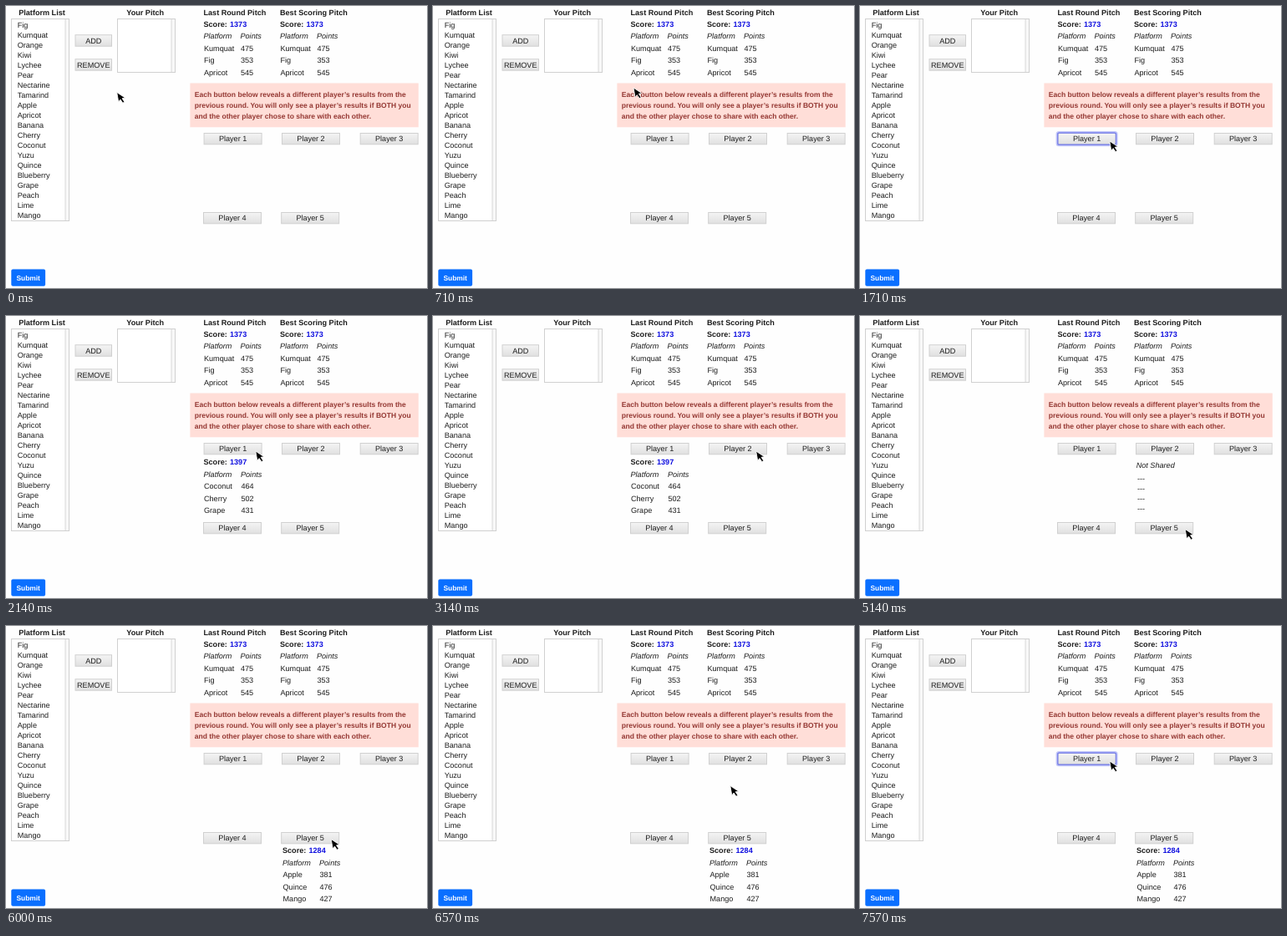
Recreate the animation shown at these times as an HTML page. Size 504 by 338 pixels, loop 8000 ms.

```html
<!DOCTYPE html>
<html lang="en">
<head>
<meta charset="utf-8">
<title>Pitch round</title>
<style>
  html, body { margin: 0; width: 100%; height: 100%; overflow: hidden; background: #fefefe; }
  svg { display: block; width: 504px; height: 338px; }
  text {
    font: 9.1px "Liberation Sans", Arial, sans-serif;
    fill: #1c1c1c;
    text-rendering: geometricPrecision;
  }
  .bold { font-weight: bold; }
  .italic { font-style: italic; }
  .score { font-weight: bold; fill: #1010e0; }
  .alert { font-weight: bold; font-size: 8.55px; fill: #943833; }
  .submit { font-weight: bold; font-size: 8.4px; fill: #fff; }
  .mid { text-anchor: middle; }
</style>
</head>
<body>
<svg id="stage" viewBox="0 0 504 338">
  <defs>
    <linearGradient id="face" x2="0" y2="1">
      <stop offset="0" stop-color="#f4f4f4"/>
      <stop offset="1" stop-color="#e0e0e0"/>
    </linearGradient>
  </defs>
</svg>
<script>
const LOOP = 8000;
const stage = document.getElementById("stage");

function add(tag, attrs, parent = stage) {
  const node = document.createElementNS("http://www.w3.org/2000/svg", tag);
  for (const key in attrs) node.setAttribute(key, attrs[key]);
  parent.appendChild(node);
  return node;
}

function label(x, y, text, cls = "", parent = stage) {
  add("text", { x, y, class: cls }, parent).textContent = text;
}

function box(x, y, width, height, fill, extra = {}, parent = stage) {
  return add("rect", { x, y, width, height, fill, ...extra }, parent);
}

function listBox(x, y, w, h) {
  box(x + .5, y + .5, w - 1, h - 1, "#fff", { stroke: "#d0d0d0" });
  box(x + w - 5, y + 1, 4, h - 2, "#f8f8f8");
  box(x + w - 5.5, y + 1, 1, h - 2, "#d8d8d8");
}

function button(x, y, w, h, text, parent = stage) {
  box(x + .5, y + .5, w - 1, h - 1, "url(#face)", { stroke: "#d0d0d0" }, parent);
  label(x + w / 2, y + h / 2 + 3.3, text, "mid", parent);
}

function scoreTable(x, y, numberX, score, rows, parent) {
  label(x, y, "Score:", "bold", parent);
  label(x + 31.5, y, score, "score", parent);
  label(x, y + 14.5, "Platform", "italic", parent);
  label(numberX - .5, y + 14.5, "Points", "italic", parent);
  rows.forEach(([name, points], i) => {
    const rowY = y + 14.5 * (i + 2);
    label(x + .5, rowY, name, "", parent);
    label(numberX, rowY, points, "", parent);
  });
}

// Left side: lists and their buttons
label(43, 10.6, "Platform List", "bold mid");
listBox(6, 15, 70, 243);
("Fig Kumquat Orange Kiwi Lychee Pear Nectarine Tamarind Apple Apricot " +
 "Banana Cherry Coconut Yuzu Quince Blueberry Grape Peach Lime Mango")
  .split(" ").forEach((fruit, i) => label(13.7, 25.5 + 12 * i, fruit));
label(166.7, 10.6, "Your Pitch", "bold mid");
listBox(133, 15, 70, 65);
button(82.5, 34.2, 44.5, 14.5, "ADD");
button(82.5, 63.2, 44.5, 14.5, "REMOVE");
box(6.3, 315.4, 40.8, 20.4, "#0a6fff", { rx: 2 });
label(26.7, 328.8, "Submit", "submit mid");

// Own scores
const ownRows = [["Kumquat", 475], ["Fig", 353], ["Apricot", 545]];
label(236.5, 10.6, "Last Round Pitch", "bold");
scoreTable(236.5, 24.8, 281, 1373, ownRows);
label(328, 10.6, "Best Scoring Pitch", "bold");
scoreTable(328, 24.8, 372.5, 1373, ownRows);

// Notice
box(220.4, 92.5, 273.4, 52.8, "#ffded8");
["Each button below reveals a different player’s results from the",
 "previous round. You will only see a player’s results if BOTH you",
 "and the other player chose to share with each other."]
  .forEach((line, i) => label(225.7, 109 + 13 * i, line, "alert"));

// Player buttons
const spots = [[236.6, 152], [330, 152], [423.7, 152], [236, 247], [329.2, 247]];
const playerButton = (i, parent) =>
  button(...spots[i], 70, 14.3, "Player " + (i + 1), parent);
spots.forEach((_, i) => playerButton(i));

// Focused looks of the buttons that get clicked
const rings = [0, 1, 4].map(i => {
  const ring = add("g", {});
  const [x, y] = spots[i];
  playerButton(i, ring);
  const edge = (grow, width, opacity) =>
    box(x - grow, y - grow, 70 + 2 * grow, 14.3 + 2 * grow, "none",
      { rx: 2, stroke: "#6a73ee", "stroke-width": width, opacity }, ring);
  edge(.5, 3, .4);
  edge(0, 1.3, .7);
  return ring;
});

// Revealed results
const first = add("g", {});
scoreTable(236.5, 178.4, 281.5, 1397,
  [["Coconut", 464], ["Cherry", 502], ["Grape", 431]], first);

const hidden = add("g", {});
label(330.7, 181.8, "Not Shared", "italic", hidden);
for (let i = 0; i < 4; i++) label(332, 198 + 12 * i, "---", "", hidden);

const fifth = add("g", {});
scoreTable(331, 272.2, 375.5, 1284,
  [["Apple", 381], ["Quince", 476], ["Mango", 427]], fifth);

const pointer = add("path", {
  d: "M0 0V11.6L2.7 9.2L4.8 13.8L7 12.8L5 8.3H8.8Z",
  fill: "#000", stroke: "#fff", "stroke-width": .8
});

// Everything changes in hard steps, two per second.
// Each waypoint: first step, x, y of the pointer tip.
const path = [
  [0, 132.7, 103.5], [1, 240, 98], [2, 350, 107], [3, 298.8, 162],
  [5, 344, 163], [6, 386.7, 162], [9, 388, 210], [10, 389.2, 255.5],
  [13, 355.8, 191.5], [14, 300, 163], [15, 298.8, 162]
];
const clickSteps = [[3, 15], [7], [11]];

function show(node, on) {
  node.setAttribute("visibility", on ? "visible" : "hidden");
}

function draw(time) {
  const t = time % LOOP;
  const step = 2 * Math.floor(t / 1000) + (t % 1000 >= 570 ? 1 : 0);

  const [, px, py] = path.filter(p => p[0] <= step).pop();
  pointer.setAttribute("transform", `translate(${px} ${py}) rotate(-10)`);

  rings.forEach((ring, i) => show(ring, clickSteps[i].includes(step)));
  show(first, step >= 4 && step < 8);
  show(hidden, step >= 8 && step < 12);
  show(fifth, step >= 12);
}

const start = performance.now();
function tick() {
  draw(performance.now() - start);
  requestAnimationFrame(tick);
}
tick();
</script>
</body>
</html>
```
